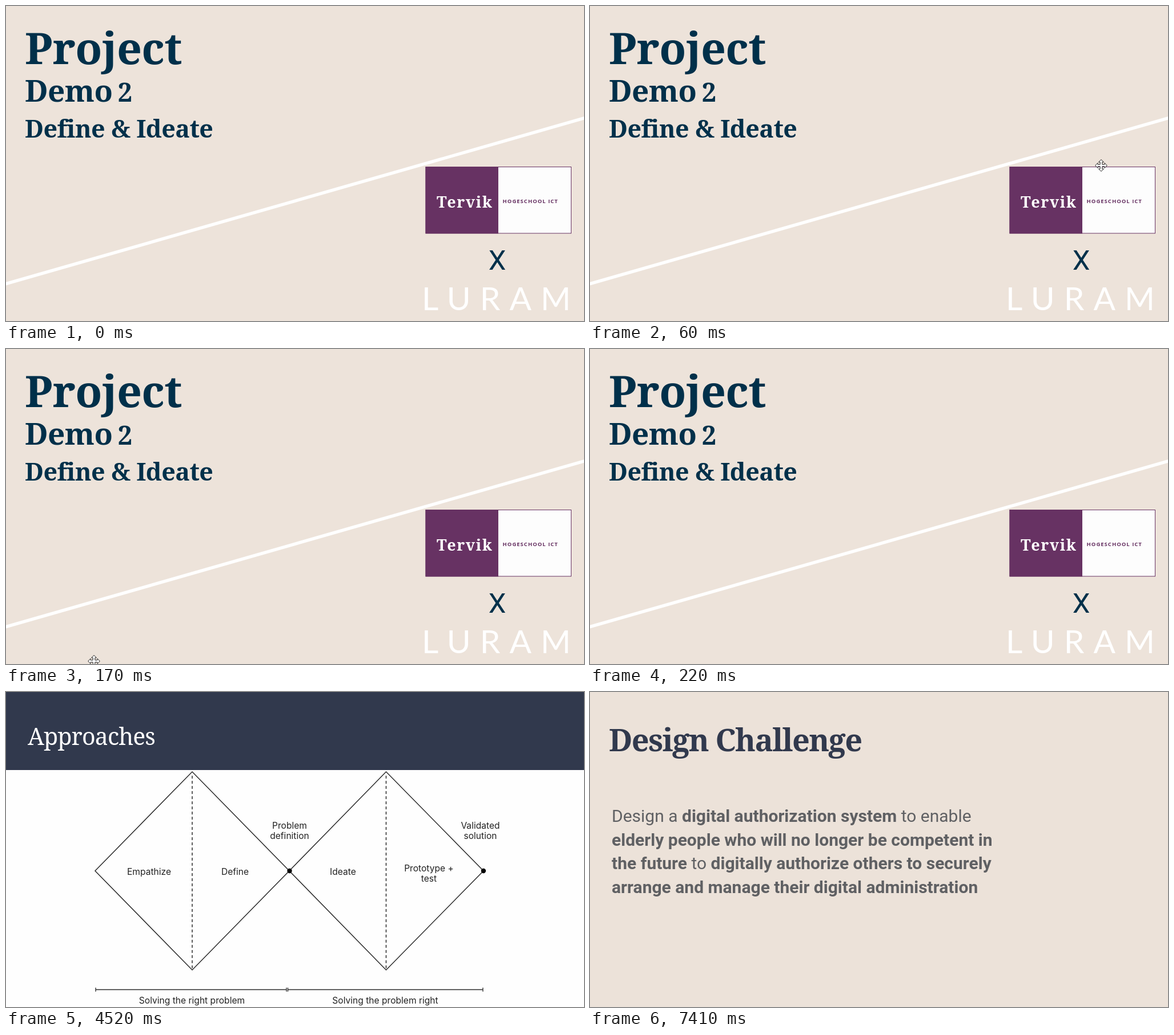
Animation, 1012 px wide and 553 px high, one loop 8000 ms. Source, as an HTML page:

```html
<!DOCTYPE html>
<html lang="en">
<head>
<meta charset="utf-8">
<title>Project demo slides</title>
<style>
  html, body { margin: 0; width: 100%; height: 100%; overflow: hidden; background: #ede3da; }
  svg { display: block; width: 100vw; height: 100vh; }
  text { white-space: pre; }
  .serif { font-family: "Noto Serif", serif; }
  .bold { font-weight: 700; letter-spacing: -.035em; }
  .sans { font-family: Roboto, sans-serif; fill: #5f6063; }
  .label { font: 15.6px Inter, sans-serif; fill: #222; text-anchor: middle; }
  .b { font-weight: 700; }
  .ink { fill: none; stroke: #2a2a2a; stroke-width: 1.5; }
</style>
</head>
<body>
<svg viewBox="0 0 1012 553" preserveAspectRatio="none">
  <g class="slide">
    <rect width="1012" height="553" fill="#ede3da"/>
    <path d="M-10 490.4L1022 194.1" stroke="#fff" stroke-width="5.5"/>
    <g class="serif bold" fill="#00304a">
      <text x="33" y="102" font-size="77">Project</text>
      <text x="33" y="168" font-size="53">Demo <tspan x="196" font-size="45">2</tspan></text>
      <text x="33" y="231" font-size="43">Define &amp; Ideate</text>
    </g>
    <rect x="735" y="282.5" width="254.5" height="116.5" fill="#fdfdfd" stroke="#673263"/>
    <rect x="734.5" y="282" width="127.5" height="117.5" fill="#673263"/>
    <text class="serif" x="754" y="354" font-size="27" font-weight="700" letter-spacing="1.5" fill="#fff">Tervik</text>
    <text x="869.5" y="346" font-family="'Open Sans', sans-serif" font-size="9.6" font-weight="700" letter-spacing=".95" fill="#673263">HOGESCHOOL ICT</text>
    <text x="860" y="463" font-family="Roboto, sans-serif" font-size="49" text-anchor="middle" fill="#00304a">X</text>
    <text x="728" y="534" font-family="Lato, sans-serif" font-size="57" letter-spacing="16" fill="#fff">LURAM</text>
    <path id="cursor" fill="#fff" stroke="#222" stroke-width="1"/>
  </g>

  <g class="slide">
    <rect width="1012" height="553" fill="#fefefe"/>
    <svg width="477" height="553">
      <rect width="477" height="553" fill="#31394d"/>
      <path d="M-10 490.4L1022 194.1" stroke="#d6c1ab" stroke-width="5.5"/>
    </svg>
    <text class="serif" x="39" y="129" font-size="74" fill="#fff">Today</text>
    <g id="agenda" class="sans" font-size="31.5"></g>
  </g>

  <g class="slide">
    <rect width="1012" height="553" fill="#fefefe"/>
    <rect width="1012" height="137" fill="#31394d"/>
    <text class="serif" x="38" y="93" font-size="41" letter-spacing="-.022em" fill="#fff">Approaches</text>
    <g class="ink">
      <path d="M156 314L326 140L496 314L326 488Z"/>
      <path d="M496 314L665.5 140L836 314L665.5 488Z"/>
      <path d="M326 147V488M665.5 147V488" stroke-dasharray="5 4"/>
      <path d="M157 522.5H491M493.5 522.5H835M157 519V526M491 519V526M493.5 519V526M835 519V526" stroke-width="1.3"/>
    </g>
    <circle cx="496.5" cy="314" r="4.2"/>
    <circle cx="836" cy="314" r="4.2"/>
    <g id="labels" class="label"></g>
  </g>

  <g class="slide">
    <rect width="1012" height="553" fill="#ece2d9"/>
    <text class="serif bold" x="33" y="104" font-size="54" style="letter-spacing:-.03em" fill="#31394d">Design Challenge</text>
    <g class="sans" font-size="30">
      <text x="38" y="228">Design a <tspan class="b">digital authorization system</tspan> to enable</text>
      <text x="38" y="269.6" class="b">elderly people who will no longer be competent in</text>
      <text x="38" y="311.2"><tspan class="b">the future</tspan> to <tspan class="b">digitally authorize others to securely</tspan></text>
      <text x="38" y="352.8" class="b">arrange and manage their digital administration</text>
    </g>
  </g>
</svg>
<script>
const LOOP = 8000;
const starts = [0, 2300, 4520, 7410];
const slides = [...document.querySelectorAll('.slide')];
const cursor = document.getElementById('cursor');

function addText(parent, x, y, str) {
  const el = document.createElementNS('http://www.w3.org/2000/svg', 'text');
  el.setAttribute('x', x);
  el.setAttribute('y', y);
  el.textContent = str;
  parent.append(el);
}

const agenda = document.getElementById('agenda');
['Last sprint', 'Design Challenge', 'Customer Journey', 'How Might we',
 'Brainstorm', 'Conclusion', 'Next sprint'].forEach((item, i) => {
  const y = 172 + i * 42.7;
  addText(agenda, 515, y, `${i + 1}.`);
  addText(agenda, 566, y, item);
});

const labels = document.getElementById('labels');
[[250.5, 320.5, 'Empathize'], [401, 320.5, 'Define'], [590, 320.5, 'Ideate'],
 [496.5, 239.5, 'Problem'], [496.5, 257.5, 'definition'],
 [830.5, 239.5, 'Validated'], [830.5, 257.5, 'solution'],
 [740.5, 314.5, 'Prototype +'], [740.5, 332.5, 'test'],
 [325.5, 547, 'Solving the right problem'], [664, 547, 'Solving the problem right']
].forEach(l => addText(labels, ...l));

// One arm of the move pointer, turned four times
const arm = [[-1.8, -1.8], [-1.8, -6], [-4.5, -6], [0, -10.3], [4.5, -6], [1.8, -6]];
const turns = [([x, y]) => [x, y], ([x, y]) => [-y, x], ([x, y]) => [-x, -y], ([x, y]) => [y, -x]];
cursor.setAttribute('d', 'M' + turns.flatMap(t => arm.map(t)).join('L') + 'Z');

// Pointer sweep: start time, x, y
const sweep = [[60, 895, 280], [90, 735, 357], [120, 556, 444], [170, 154, 548]];
const sweepEnd = 220;

function draw(t) {
  const current = starts.filter(s => s <= t).length - 1;
  slides.forEach((s, i) => s.style.display = i === current ? '' : 'none');
  const step = t < sweepEnd && sweep.filter(s => s[0] <= t).pop();
  cursor.style.display = step ? '' : 'none';
  if (step) cursor.setAttribute('transform', `translate(${step[1]} ${step[2]})`);
}

const begin = performance.now();
function tick() {
  draw((performance.now() - begin) % LOOP);
  requestAnimationFrame(tick);
}
tick();
</script>
</body>
</html>
```
